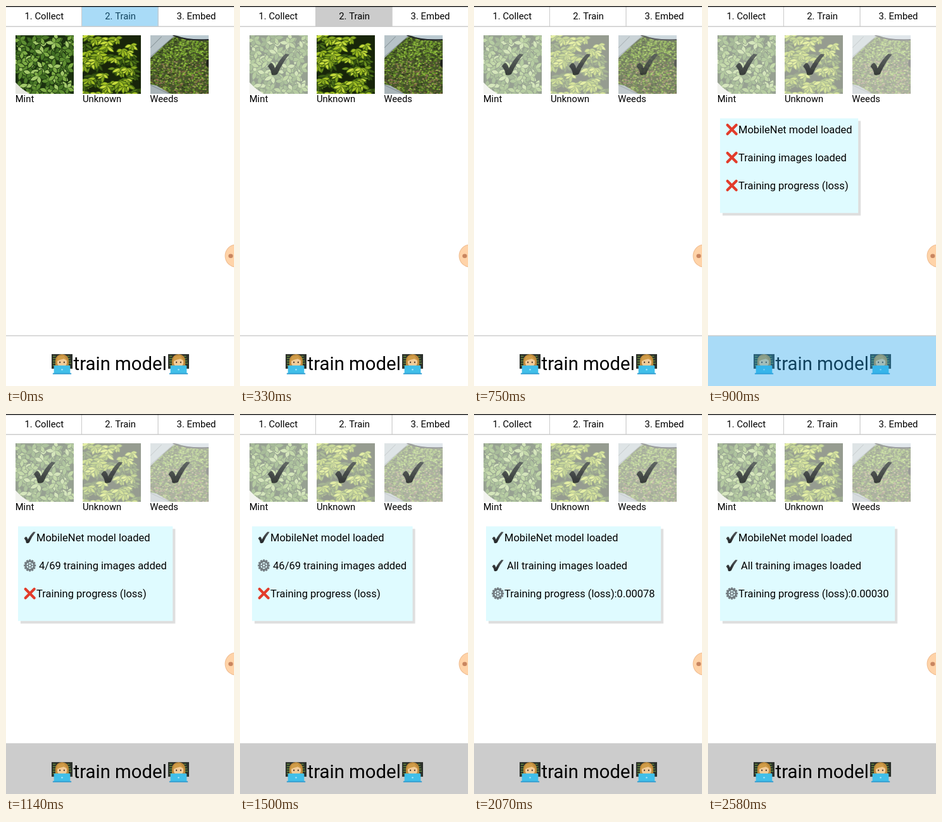
An HTML page with a canvas for the animation above (2.61 s loop, 360 by 597 pixels).

```html
<!DOCTYPE html>
<html lang="en">
<head>
<meta charset="utf-8">
<title>Train model</title>
<style>
html, body { margin: 0; width: 100%; height: 100%; overflow: hidden; background: #fff; }
canvas { display: block; }
</style>
</head>
<body>
<canvas id="stage" width="360" height="597"></canvas>
<script>
const ctx = document.getElementById('stage').getContext('2d');
const LOOP = 2610, STEP = 30, SIZE = 92;
const TAP = 'rgba(40,165,235,0.4)';
const LINE = '#cbcbcb', HOVER = '#cccccc';

const TIMES = {
  tabReleased: 180, tabLeft: 420,
  trainTap: 840, trainReleased: 1020,
  modelLoaded: 1080, imagesStart: 1110, imagesDone: 1710, lossStart: 1740
};
const tiles = [
  { label: 'Mint', x: 15, picked: 210 },
  { label: 'Unknown', x: 121.3, picked: 555 },
  { label: 'Weeds', x: 227.6, picked: 705 }
];

const clamp = v => Math.max(0, Math.min(1, v));

function seeded(seed) {
  return () => (seed = (seed * 16807) % 2147483647) / 2147483647;
}

function rect(c, x, y, w, h, fill) {
  c.fillStyle = fill;
  c.fillRect(x, y, w, h);
}

function poly(c, points, fill) {
  c.beginPath();
  points.forEach(([x, y]) => c.lineTo(x, y));
  c.closePath();
  c.fillStyle = fill;
  c.fill();
}

function oval(c, x, y, rx, ry, fill) {
  c.beginPath();
  c.ellipse(x, y, rx, ry, 0, 0, Math.PI * 2);
  c.fillStyle = fill;
  c.fill();
}

function text(str, x, y, size, align = 'left') {
  ctx.font = `${size}px Roboto, sans-serif`;
  ctx.textAlign = align;
  ctx.fillStyle = '#000';
  ctx.fillText(str, x, y);
}

function leaf(c, x, y, angle, length, width, fill) {
  c.save();
  c.translate(x, y);
  c.rotate(angle);
  c.beginPath();
  c.moveTo(0, 0);
  c.quadraticCurveTo(length * 0.45, -width, length, 0);
  c.quadraticCurveTo(length * 0.45, width, 0, 0);
  c.fillStyle = fill;
  c.fill();
  c.restore();
}

// Sprigs of leaves, each with a darker rim, around scattered centres.
function foliage(c, rnd, count, fan, length, width, rim, colors) {
  for (let i = 0; i < count; i++) {
    const x = rnd() * SIZE, y = rnd() * SIZE, turn = rnd() * 6.28;
    for (let k = 0; k < 5; k++) {
      const angle = fan ? 0.2 + k * 0.65 + (rnd() - 0.5) * 0.6 : turn + k * 1.26;
      const shade = colors[Math.floor(rnd() * colors.length)];
      const reach = length * (0.7 + rnd() * 0.5);
      leaf(c, x, y, angle, reach + 1, width + 2, rim);
      leaf(c, x, y, angle, reach, width, shade);
    }
  }
}

const painters = [
  c => {
    rect(c, 0, 0, SIZE, SIZE, '#1b3010');
    foliage(c, seeded(41), 62, false, 12, 6, '#1f3812', ['#3f6b22', '#5f8f32', '#7fae46', '#a3c96a', '#4e7c2a']);
    poly(c, [[0, 74], [9, 83], [22, 92], [0, 92]], '#e6e7e0');
  },
  c => {
    rect(c, 0, 0, SIZE, SIZE, '#18250a');
    foliage(c, seeded(87), 34, true, 12, 4, '#1d2e0c', ['#4d721a', '#6f9520', '#3a5a14']);
    foliage(c, seeded(19), 40, true, 12, 4.5, '#33500f', ['#a4c224', '#c6dc3c', '#86a820']);
  },
  c => {
    const rnd = seeded(63);
    const greens = ['#5f8628', '#84b035', '#9cc548', '#2f3d1a', '#6c9a2a'];
    const soils = ['#8b6c4e', '#66543a', '#a58c68'];
    rect(c, 0, 0, SIZE, SIZE, '#45542a');
    for (let i = 0; i < 1500; i++) {
      const x = rnd() * SIZE, y = rnd() * SIZE;
      const shades = y > 40 && rnd() < 0.3 ? soils : greens;
      oval(c, x, y, 0.7 + rnd() * 1.1, 0.6 + rnd() * 0.9, shades[Math.floor(rnd() * shades.length)]);
    }
    poly(c, [[0, 0], [42, 0], [30, 8], [0, 36]], '#b7c3c8');
    poly(c, [[40, 0], [92, 0], [92, 8], [62, 7]], '#bccbd2');
    poly(c, [[0, 77], [10, 79], [32, 92], [0, 92]], '#a9b4b8');
    c.lineWidth = 2;
    c.strokeStyle = '#22262a';
    c.beginPath();
    c.moveTo(36, 0);
    c.quadraticCurveTo(58, 9, 92, 7);
    c.stroke();
    c.lineWidth = 1;
    c.strokeStyle = '#7d898e';
    c.beginPath();
    c.moveTo(0, 34);
    c.lineTo(36, 3);
    c.moveTo(0, 20);
    c.lineTo(18, 2);
    c.moveTo(0, 78);
    c.lineTo(30, 92);
    c.stroke();
    oval(c, 91, 44, 3, 6, '#20241c');
  }
];

tiles.forEach((tile, i) => {
  tile.photo = document.createElement('canvas');
  tile.photo.width = tile.photo.height = SIZE;
  painters[i](tile.photo.getContext('2d'));
});

function check(cx, cy, size, alpha = 1) {
  const s = size / 34;
  ctx.save();
  ctx.globalAlpha = alpha;
  ctx.translate(cx, cy);
  ctx.scale(s, s);
  ctx.beginPath();
  ctx.moveTo(-17, 3);
  ctx.quadraticCurveTo(-13, -4, -10, -2);
  ctx.quadraticCurveTo(-7, 1, -6, 6);
  ctx.quadraticCurveTo(2, -9, 11, -17);
  ctx.lineTo(17, -16);
  ctx.quadraticCurveTo(6, -3, -2, 15);
  ctx.quadraticCurveTo(-7, 18, -11, 16);
  ctx.quadraticCurveTo(-12, 8, -17, 3);
  const shade = ctx.createLinearGradient(0, -17, 0, 17);
  shade.addColorStop(0, '#53585b');
  shade.addColorStop(1, '#202325');
  ctx.fillStyle = shade;
  ctx.fill();
  ctx.restore();
}

function cross(cx, cy) {
  ctx.lineWidth = 4.2;
  ctx.lineCap = 'round';
  ctx.strokeStyle = '#e23c2b';
  ctx.beginPath();
  ctx.moveTo(cx - 7, cy - 7);
  ctx.lineTo(cx + 7, cy + 7);
  ctx.moveTo(cx + 7, cy - 7);
  ctx.lineTo(cx - 7, cy + 7);
  ctx.stroke();
  ctx.lineCap = 'butt';
}

function gear(cx, cy) {
  ctx.save();
  ctx.translate(cx, cy);
  ctx.strokeStyle = ctx.fillStyle = '#727b80';
  for (let i = 0; i < 12; i++) {
    ctx.rotate(Math.PI / 6);
    ctx.fillRect(-1.5, -9.5, 3, 4);
  }
  ctx.lineWidth = 2.6;
  ctx.beginPath();
  ctx.arc(0, 0, 6.7, 0, 6.2832);
  ctx.stroke();
  ctx.lineWidth = 1.5;
  for (let i = 0; i < 6; i++) {
    ctx.rotate(Math.PI / 3);
    ctx.beginPath();
    ctx.moveTo(2, 0);
    ctx.lineTo(6, 0);
    ctx.stroke();
  }
  ctx.beginPath();
  ctx.arc(0, 0, 2.4, 0, 6.2832);
  ctx.stroke();
  ctx.restore();
}

function technologist(x, y) {
  ctx.save();
  ctx.translate(x, y);
  ctx.scale(33 / 36, 33 / 36);
  rect(ctx, 0, 1, 36, 25, '#2c302b');
  for (let row = 0; row < 5; row++) {
    rect(ctx, 2, 4 + row * 4, 5 + (row * 3) % 4, 1.3, '#6c9a3c');
    rect(ctx, 27, 4 + row * 4, 4 + (row * 5) % 4, 1.3, '#6c9a3c');
  }
  oval(ctx, 18, 12, 11.5, 11, '#bf8a3c');
  rect(ctx, 6.5, 12, 23, 12, '#bf8a3c');
  oval(ctx, 18, 15, 8.5, 8.5, '#f3cc98');
  poly(ctx, [[8, 14], [11, 5], [21, 3], [28, 13], [21, 9], [14, 11]], '#d09c48');
  oval(ctx, 14.3, 15, 1.2, 1.4, '#4c392d');
  oval(ctx, 21.7, 15, 1.2, 1.4, '#4c392d');
  ctx.beginPath();
  ctx.roundRect(4, 20.5, 28, 14, 1.5);
  ctx.fillStyle = '#41bfe9';
  ctx.fill();
  rect(ctx, 2, 33.5, 32, 2, '#2c9bd0');
  oval(ctx, 18, 27.5, 1.4, 1.4, '#a5e3fa');
  ctx.restore();
}

function drawTabs(t) {
  if (t >= TIMES.tabReleased && t < TIMES.tabLeft) rect(ctx, 119, 1, 121, 31, HOVER);
  text('1. Collect', 60.3, 21, 14.8, 'center');
  text('2. Train', 180.6, 21, 14.8, 'center');
  text('3. Embed', 300.5, 21, 14.8, 'center');
  if (t < TIMES.tabReleased) rect(ctx, 119, 1, 122, 31, TAP);
  rect(ctx, 119, 1, 1, 31, LINE);
  rect(ctx, 239.5, 1, 1.2, 31, LINE);
  rect(ctx, 0, 31.5, 360, 1.5, LINE);
  rect(ctx, 0, 0, 360, 1.4, '#111');
}

function drawTile({ label, x, picked, photo }, t) {
  const fade = clamp((t - picked - 15) / 60);
  ctx.globalAlpha = 1 - 0.55 * fade;
  ctx.drawImage(photo, x, 46, SIZE, SIZE);
  ctx.globalAlpha = 1;
  if (t >= picked) check(x + 46, 92, 34, 0.7 + 0.15 * fade);
  text(label, x - 0.3, 151.2, 14.8);
}

function lossAt(elapsed) {
  const e = Math.max(STEP, elapsed);
  return 0.8 * Math.exp(-e / 25) + 0.00078 * Math.pow(330 / e, 1.023);
}

function statusLines(t) {
  const loaded = t >= TIMES.modelLoaded;
  const added = Math.min(69, Math.round((t - TIMES.imagesStart) * 46 / 390));
  let images = [cross, 'Training images loaded'];
  if (t >= TIMES.imagesDone) images = [check, ' All training images loaded'];
  else if (t >= TIMES.imagesStart) images = [gear, ` ${added}/69 training images added`];
  const training = t >= TIMES.lossStart;
  const loss = training ? ':' + lossAt(t - TIMES.lossStart).toFixed(5) : '';
  return [
    [loaded ? check : cross, 'MobileNet model loaded'],
    images,
    [training ? gear : cross, 'Training progress (loss)' + loss]
  ];
}

function drawPanel(t) {
  if (t < TIMES.trainTap) return;
  const lines = statusLines(t);
  ctx.font = '16.5px Roboto, sans-serif';
  const widest = Math.max(...lines.map(line => ctx.measureText(line[1]).width));
  ctx.save();
  ctx.shadowColor = '#dedede';
  ctx.shadowOffsetX = ctx.shadowOffsetY = 4;
  ctx.shadowBlur = 1;
  rect(ctx, 19, 176.5, widest + 38.5, 148.7, '#dffbff');
  ctx.restore();
  lines.forEach(([icon, label], i) => {
    const y = 194 + i * 44;
    icon(37.7, y, 18);
    text(label, 48, y + 5.6, 16.5);
  });
}

function drawButton(t) {
  if (t >= TIMES.trainReleased) rect(ctx, 0, 518, 360, 79, HOVER);
  technologist(72, 546);
  text('train model', 180.2, 572.3, 29.33, 'center');
  technologist(256, 546);
  if (t >= TIMES.trainTap && t < TIMES.trainReleased) rect(ctx, 0, 518, 360, 79, TAP);
  rect(ctx, 0, 517.3, 360, 1.4, LINE);
}

function drawBubble() {
  oval(ctx, 363, 392.5, 17.5, 18, '#efbd91');
  oval(ctx, 363, 392.5, 16.5, 17, '#ffd3a8');
  oval(ctx, 354.8, 392.7, 3.6, 3.2, '#c98660');
}

function draw(t) {
  rect(ctx, 0, 0, 360, 597, '#fff');
  drawTabs(t);
  tiles.forEach(tile => drawTile(tile, t));
  drawPanel(t);
  drawButton(t);
  drawBubble();
}

const start = performance.now();
function tick() {
  const t = (performance.now() - start) % LOOP;
  draw(Math.floor(t / STEP) * STEP);
  requestAnimationFrame(tick);
}
tick();
</script>
</body>
</html>
```
